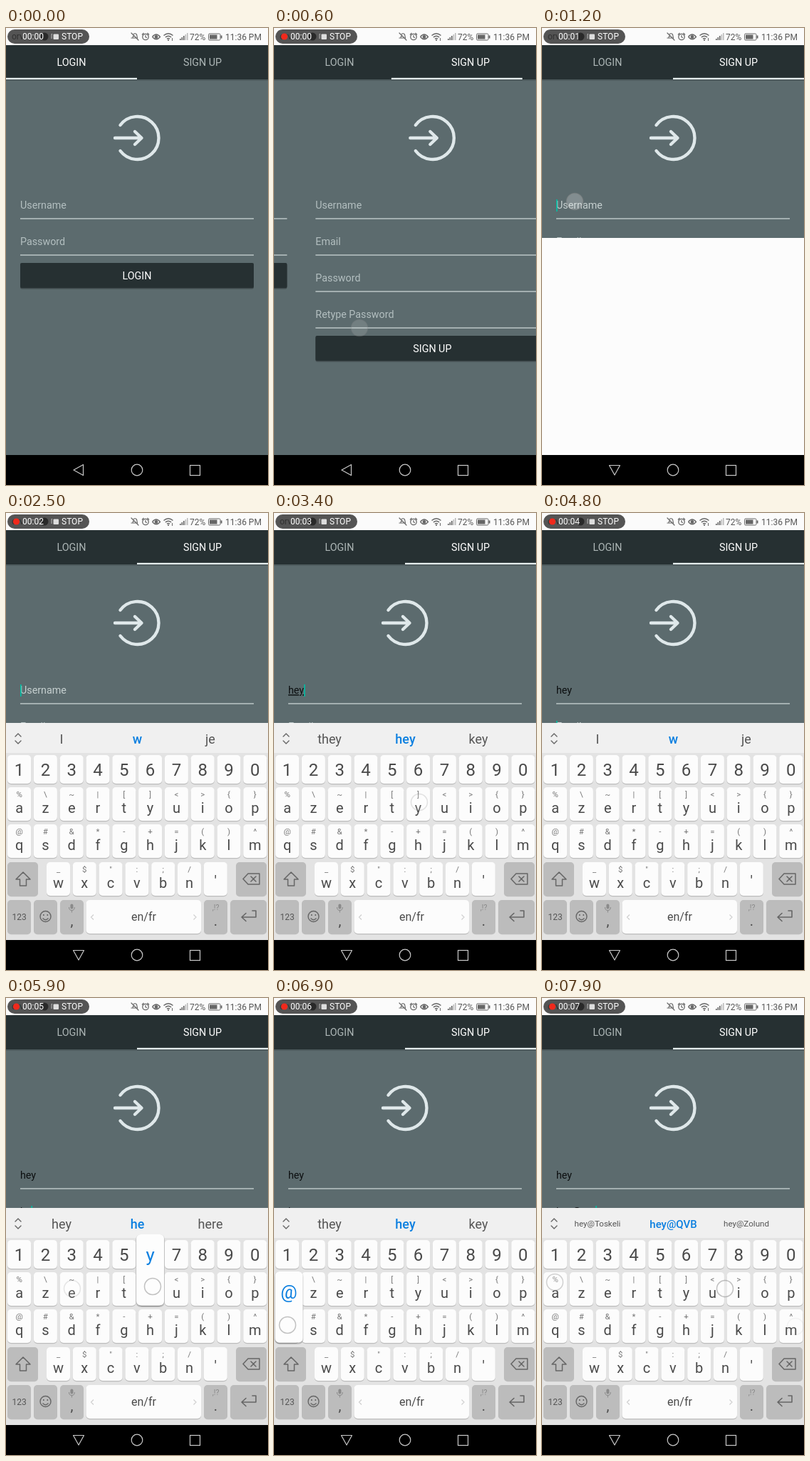
Animation of 368 by 640 pixels, one loop 8000 ms. Source, as an HTML page:

```html
<!DOCTYPE html>
<html lang="en">
<head>
<meta charset="utf-8">
<title>Sign up form</title>
<style>
html, body { margin: 0; width: 100%; height: 100%; overflow: hidden; background: #000; }
svg { display: block; width: 368px; height: 640px; font-family: Roboto, "Noto Sans", sans-serif; }
</style>
</head>
<body>
<svg id="stage" viewBox="0 0 368 640" xmlns="http://www.w3.org/2000/svg"></svg>
<script>
const LOOP = 8000, W = 368, PITCH = 36.8;
const DARK = '#263032', SLATE = '#5c6b6e', PALE = '#dfe8ea', HINT = '#b3bfc0';

const rect = (x, y, w, h, fill, more = '') =>
  `<rect x="${x}" y="${y}" width="${w}" height="${h}" fill="${fill}" ${more}/>`;
const text = (x, y, size, fill, str, more = 'text-anchor="middle"') =>
  `<text x="${x}" y="${y}" font-size="${size}" fill="${fill}" ${more}>${str.replace(/&/g, '&amp;').replace(/</g, '&lt;')}</text>`;
const line = (d, stroke, width, more = '') =>
  `<path d="${d}" fill="none" stroke="${stroke}" stroke-width="${width}" ${more}/>`;
const round = 'stroke-linecap="round" stroke-linejoin="round"';

// ---- form pages ----
const field = (y, label, id) =>
  text(20, y, 14.3, HINT, label, id ? `id="${id}"` : '') +
  rect(20, y + 13.2, 328, 1.2, '#d3dddd');
const button = (y, label) =>
  rect(20, y + 1.5, 328, 35.5, '#000', 'rx="3" opacity=".12"') +
  rect(20, y + 1, 328, 35.3, '#000', 'rx="2" opacity=".2"') +
  rect(20, y, 328, 35, DARK, 'rx="2"') +
  text(184, y + 22.7, 14.3, '#fff', label);
const icon = line('M160.5 136A30 30 0 1 1 160.5 172M153 154H190M181 145L190.5 154L181 163', PALE, 4.4, round);

const loginPage = icon + field(253.2, 'Username') + field(304.2, 'Password') + button(329, 'LOGIN');
const signupPage = icon + field(253.2, 'Username', 'user') + field(304.2, 'Email', 'email') +
  field(355.2, 'Password') + field(406.2, 'Retype Password') + button(431, 'SIGN UP') +
  rect(0, 0, 1.6, 17, '#00bfa5', 'id="caret"');

// ---- keyboard ----
const key = (x, y, w, h, fill = '#fcfcfc') =>
  rect(x, y + 1.3, w, h, '#bdbdbd', 'rx="5"') + rect(x, y, w, h, fill, 'rx="5"');
const GREY = '#bcbcbc', INK = '#4a4a4a';

function letterRow(chars, marks, first, top) {
  return [...chars].map((c, i) => {
    const cx = first + i * PITCH;
    return key(cx - 16.5, top, 33, 47) +
      text(cx, top + 14.3, 11.5, '#777', marks[i] || ' ') +
      text(cx, top + (c === "'" ? 33 : 36), 20, INK, c);
  }).join('');
}

function keyboard() {
  let s = rect(0, 294, W, 304, '#e3e3e3') + rect(0, 294, W, 42, '#f0f0f0');
  s += line('M13 313L17 309L21 313M13 319L17 323L21 319', '#666', 1.4, round);
  for (const x of [78, 184.5, 287]) s += text(x, 322.5, 18, x > 180 && x < 190 ? '#0b7fe0' : '#555', ' ', 'class="hint" text-anchor="middle"');
  [...'1234567890'].forEach((c, i) => {
    const cx = 18.6 + i * PITCH;
    s += key(cx - 16.5, 339, 33, 40) + text(cx, 368, 24, INK, c);
  });
  s += letterRow('azertyuiop', '%\\~|[]<>{}', 18.6, 384);
  s += letterRow('qsdfghjklm', '@#&*-+=()^', 18.6, 436);
  s += letterRow("wxcvbn'", '_$":;/', 73.5, 489);
  s += key(2, 489, 43, 47, GREY) + line('M24 503L34 513H28.5V522H19.5V513H14Z', '#666', 1.5, round);
  s += key(323, 489, 43, 47, GREY) +
    line('M333 512.5L340 505H356V520H340ZM344 509L351 516M351 509L344 516', '#666', 1.5, round);
  s += key(2, 542, 33, 47, GREY) + text(18.6, 570, 12, '#555', '123');
  s += key(39, 542, 33, 47, GREY) + '<circle cx="55.5" cy="565" r="7.5" fill="none" stroke="#666" stroke-width="1.4"/>' +
    '<path d="M52 563h1.6M57.5 563h1.6" stroke="#666" stroke-width="2"/>' + line('M51.5 567.5Q55.5 572 59.5 567.5', '#666', 1.3);
  s += key(76, 542, 33, 47, GREY) + rect(90.4, 547.5, 4, 7, '#8a8a8a', 'rx="2"') +
    line('M88.5 552Q88.5 556.5 92.4 556.5T96.3 552M92.4 556.5V559.5', '#8a8a8a', 1) + text(92.4, 578, 20, INK, ',');
  s += key(112.5, 542, 161.5, 47) + text(193.5, 571, 16, INK, 'en/fr') +
    line('M123 562.5L119.5 566L123 569.5M263.5 562.5L267 566L263.5 569.5', '#d0d0d0', 1.2);
  s += key(278, 542, 33, 47, GREY) + text(294.5, 556, 10.5, '#8a8a8a', ',!?') + text(294.5, 578, 20, INK, '.');
  s += key(315, 542, 51, 47, GREY) + line('M351 557V566H331M337 560.5L331 566L337 571.5M351 557H346', '#666', 1.6, round);
  return s;
}

// ---- system bars ----
function statusBar() {
  const c = '#666';
  let s = rect(0, 0, W, 24, '#fbfbfb') + text(8, 16, 12, '#444', 'orv', '') +
    '<circle cx="54" cy="12" r="5.5" fill="#222"/>';
  s += rect(2, 2, 115, 20, '#2b2b2b', 'rx="10" opacity=".8"');
  s += '<circle id="rec" cx="14.5" cy="12" r="4.6" fill="#f0291c"/>';
  s += text(23, 16.3, 12, '#fff', '00:00', 'id="clock"');
  s += rect(66.5, 8.5, 7.5, 7.5, '#ddd', 'rx="1"') + line('M64 15V8.5H65', '#bbb', 1);
  s += text(78, 16.3, 12, '#fff', 'STOP', '');
  s += line('M176 14H178L179 9Q181 6.5 183.5 9L184.5 14H176M176 7L186 17', c, 1.2, round);
  s += '<circle cx="196" cy="12.5" r="4.2" fill="none" stroke="#666" stroke-width="1.3"/>' +
    line('M196 10V12.7L198 13.7M191 9.5L193.5 7M201 9.5L198.5 7', c, 1.2);
  s += line('M205.5 12.5Q211 5.5 216.5 12.5Q211 19 205.5 12.5', c, 1.3) + '<circle cx="211" cy="12.5" r="2.4" fill="#666"/>';
  s += line('M221.5 10.5Q228 5 234.5 10.5M223.8 13Q228 9.5 232.2 13M226 15.3Q228 13.6 230 15.3', c, 1.4);
  s += '<circle cx="228" cy="17" r="1.1" fill="#666"/>' + line('M233.5 14V18', c, 1);
  for (let i = 0; i < 5; i++) s += rect(244 + i * 2.5, 15 - i * 2, 1.6, 2 + i * 2, i < 3 ? c : '#bbb');
  s += text(258, 16.5, 12, '#555', '72%', '');
  s += rect(284.5, 8, 16.5, 9, 'none', 'rx="1.5" stroke="#666"') + rect(286, 9.5, 10.5, 6, c) + rect(301.5, 10.5, 2, 4, c);
  return s + text(308, 16.5, 12, '#555', '11:36 PM', '');
}

const navBar = rect(0, 598, W, 42, '#000') +
  line('', '#c9c9c9', 1.2, 'id="back" stroke-linejoin="round"') +
  '<circle cx="184" cy="619" r="7.8" fill="none" stroke="#c9c9c9" stroke-width="1.2"/>' +
  rect(258.5, 612.5, 14, 14, 'none', 'stroke="#c9c9c9" stroke-width="1.2"');

const tabs = rect(0, 72, W, 2, '#000', 'opacity=".14"') + rect(0, 24, W, 48, DARK) +
  text(92, 53.3, 14.3, '#fff', 'LOGIN', 'id="tabA" text-anchor="middle"') +
  text(276, 53.3, 14.3, '#fff', 'SIGN UP', 'id="tabB" text-anchor="middle"') +
  rect(0, 69.8, 184, 2.2, '#e6eeee', 'id="mark"');

const popup = '<g id="popup">' + rect(-20.5, -53, 41, 102, '#000', 'rx="7" opacity=".1"') +
  rect(-20, -52, 40, 100.5, '#000', 'rx="7" opacity=".12"') + rect(-19.5, -53, 39, 99.5, '#fdfdfd', 'rx="6"') +
  text(0, -15, 26, '#0b7fe0', 'y', 'id="popChar" text-anchor="middle"') + '</g>';

const stage = document.getElementById('stage');
stage.innerHTML =
  '<clipPath id="appClip"><rect id="appBox" x="0" y="24" width="368" height="574"/></clipPath>' +
  rect(0, 0, W, 640, '#fcfcfc') +
  '<g clip-path="url(#appClip)">' + rect(0, 24, W, 574, SLATE) +
  `<g id="pager"><g>${loginPage}</g><g transform="translate(368 0)">${signupPage}</g></g>${tabs}</g>` +
  `<g id="keys">${keyboard()}</g>${popup}${navBar}${statusBar()}<g id="touches"></g>`;
const $ = id => document.getElementById(id);
const hints = [...document.querySelectorAll('.hint')];

// ---- timeline ----
// key presses: time, x, y, key centre x, key top, character, hold
const presses = [
  [2600, 200, 459, 202.6, 436, 'h'], [2850, 94, 406, 92.2, 384, 'e'], [3100, 204, 405, 202.6, 384, 'y'],
  [5350, 201, 458, 202.6, 436, 'h'], [5580, 93, 407, 92.2, 384, 'e'], [5800, 206, 404, 202.6, 384, 'y'],
  [6550, 19, 458, 18.6, 436, '@', 600],
  [7510, 356, 460, 349.8, 436, 'm'], [7690, 18, 398, 18.6, 384, 'a'], [7870, 257, 407, 276.2, 384, 'i']
].map(([t, x, y, cx, top, ch, hold = 130]) => ({ t, x, y, cx, top, ch, hold, end: t + hold }));
const taps = [[1020, 46, 243], [3420, 102, 619], [4280, 50, 300]].map(([t, x, y]) => ({ t, x, y, hold: 110 }));

const OPEN1 = 1150, CLOSE = 3550, OPEN2 = 4400;
const suggest = {
  '': ['I', 'w', 'je'], h: ['he', 'h', 'have'], he: ['hey', 'he', 'here'], hey: ['they', 'hey', 'key'],
  'hey@': ['hey', 'hey@', 'here'], long: ['hey@Toskeli', 'hey@QVB', 'hey@Zolund']
};

const ramp = (t, a, b) => Math.min(1, Math.max(0, (t - a) / (b - a)));
const out = k => 1 - (1 - k) ** 3;
const inOut = k => k * k * (3 - 2 * k);

const swipe = t => 0.5 * inOut(ramp(t, 140, 430)) + 0.5 * out(ramp(t, 430, 850));

const marker = (x, y, a) => a <= 0 ? '' :
  `<circle cx="${x}" cy="${y}" r="11.5" fill="#fff" fill-opacity=".3" stroke="#8f8f8f" stroke-opacity=".55" stroke-width="1.5" opacity="${a.toFixed(3)}"/>`;

function set(el, attrs) { for (const k in attrs) el.setAttribute(k, attrs[k]); }

function drawField(el, str, hint, focused, composing) {
  el.textContent = str || hint;
  set(el, { fill: str ? '#0c0f10' : focused ? '#c6d0d0' : HINT, 'text-decoration': str && composing ? 'underline' : 'none' });
}

function draw(t) {
  const p = swipe(t);
  set($('pager'), { transform: `translate(${-W * p} 0)` });
  set($('mark'), { x: 184 * p });
  set($('tabA'), { fill: p < 0.5 ? '#fff' : '#aeb7b7' });
  set($('tabB'), { fill: p < 0.5 ? '#aeb7b7' : '#fff' });

  const open = t >= OPEN1 && t < CLOSE || t >= OPEN2;
  const shown = t < CLOSE ? out(ramp(t, 1230, 1500)) : t < OPEN2 ? 1 - inOut(ramp(t, CLOSE, 3800)) : out(ramp(t, 4460, 4720));
  set($('appBox'), { height: open ? 270 : 574 });
  set($('keys'), { transform: `translate(0 ${304 * (1 - shown)})`, visibility: shown > 0 ? 'visible' : 'hidden' });
  set($('back'), { d: open ? 'M94.5 612.5H109.5L102 626Z' : 'M108.5 611.5V626.5L95 619Z' });

  // typed text
  const done = presses.filter(k => k.end <= t);
  const typed = late => done.filter(k => (k.t > OPEN2) === late).map(k => k.ch).join('');
  const user = typed(false), mail = typed(true), onMail = t >= OPEN2;
  drawField($('user'), user, 'Username', t >= OPEN1 && !onMail, !onMail);
  drawField($('email'), mail, 'Email', onMail, true);
  const active = onMail ? mail : user;
  const width = active ? $(onMail ? 'email' : 'user').getComputedTextLength() : 0;
  const lastEvent = Math.max(onMail ? OPEN2 : OPEN1, ...done.map(k => k.end));
  set($('caret'), {
    x: 20 + width, y: onMail ? 291 : 240,
    visibility: t >= OPEN1 && (t - lastEvent) % 1000 < 500 ? 'visible' : 'hidden'
  });

  const words = suggest[active] || suggest.long;
  hints.forEach((el, i) => {
    el.textContent = words[i];
    set(el, { 'font-size': words[i].length < 6 ? 18 : i === 1 ? 15 : 11.6, y: words[i].length < 6 ? 322.5 : i === 1 ? 321.5 : 320,
      'font-weight': i === 1 ? 500 : 400 });
  });

  // pressed key balloon
  const hit = presses.find(k => t >= k.t + 40 && t < k.end);
  set($('popup'), { visibility: hit ? 'visible' : 'hidden' });
  if (hit) {
    set($('popup'), { transform: `translate(${Math.min(347, Math.max(21, hit.cx))} ${hit.top})` });
    $('popChar').textContent = hit.ch === '@' && t < hit.t + 350 ? 'q' : hit.ch;
  }

  // touch markers
  let dots = '';
  for (const k of [...presses, ...taps])
    if (t >= k.t) dots += marker(k.x, k.y, 1 - ramp(t, k.t + k.hold, k.t + k.hold + 310));
  if (t >= 90) dots += marker(320 - 200 * inOut(ramp(t, 110, 430)), 432 - 12 * ramp(t, 110, 430), 1 - ramp(t, 430, 740));
  $('touches').innerHTML = dots;

  $('clock').textContent = '00:0' + Math.floor(t / 1000);
  set($('rec'), { visibility: t % 1000 >= 500 ? 'visible' : 'hidden' });
}

const start = performance.now();
function tick() {
  draw((performance.now() - start) % LOOP);
  requestAnimationFrame(tick);
}
tick();
</script>
</body>
</html>
```
